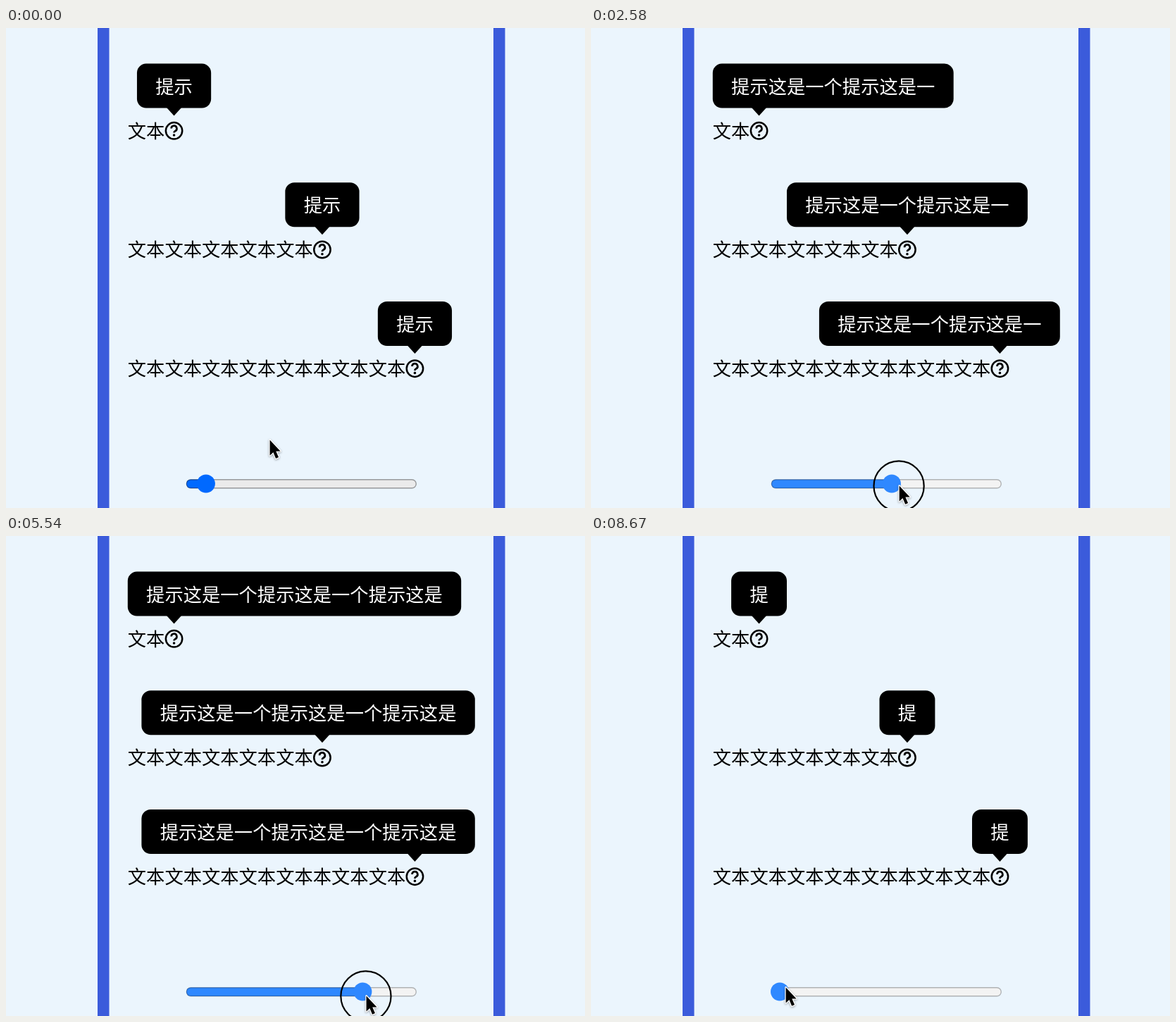
These frames come from a looping animation (822x681 px, 8710 ms). An HTML page:

```html
<!DOCTYPE html>
<html lang="zh-CN">
<head>
<meta charset="utf-8">
<style>
  html, body { margin: 0; width: 100%; height: 100%; overflow: hidden; background: #ebf5fd; }
  svg { display: block; width: 100vw; height: 100vh; }
  text { font: 26.3px "Noto Sans CJK SC", "Noto Sans CJK", "Noto Sans CJK JP", sans-serif; }
  .tip text { fill: #fff; font-weight: 500; }
</style>
</head>
<body>
<svg id="stage" viewBox="0 0 822 681">
  <rect width="822" height="681" fill="#ebf5fd"/>
  <path d="M130 0h16.5v681H130zM692 0h16.5v681H692z" fill="#3b5bdb"/>
  <g id="rows"></g>
  <rect id="track" x="256" y="640.5" width="326.5" height="12.5" rx="6.2"/>
  <rect id="filled" x="256" y="640.5" height="12.5" rx="6.2"/>
  <rect id="border" x="256.3" y="640.8" width="326" height="12" rx="6" fill="none" stroke="#000" stroke-width="1.4"/>
  <circle id="thumb" cy="646.5" r="13"/>
  <g id="pointer">
    <circle id="ring" r="35.6" fill="none" stroke="#000" stroke-width="2.2"/>
    <path d="M.6-.6V21.4L5.4 17 9.1 25.8 13 24.1 9.3 15.5H15.6Z" fill="#000" stroke="#fff"
      stroke-width="2.6" stroke-linejoin="round" paint-order="stroke"
      style="filter:drop-shadow(0 1.5px 1.5px rgba(0,0,0,.35))"/>
  </g>
</svg>
<script>
const LOOP = 8710, PRESS = 960, RELEASE = 8560, LAG = 60;
const EM = 26.3, LEFT = 172.8, RIGHT = 665.8, ROW_STEP = 168.7, LINE = 36.9;
const MAX_CHARS = 20, PER_LINE = 16, THUMB_MIN = 268, THUMB_MAX = 570;
const PHRASE = "提示这是一个".repeat(4);
const LABELS = ["文本", "文本".repeat(5), "文本".repeat(5) + "本" + "文本".repeat(2)];

const pathX = [[40, 374], [880, 281], [1150, 281], [2580, 437], [3710, 548], [4100, 577],
  [4450, 577], [5420, 515], [5540, 511], [6710, 386], [7300, 325], [7700, 295],
  [8100, 281], [8400, 271], [8560, 272], [8670, 276]];
const pathY = [[40, 585], [880, 644], [1150, 644], [2580, 650], [3710, 650], [5540, 653],
  [6710, 649], [8400, 644], [8670, 641]];

const byId = id => document.getElementById(id);
const clamp = (v, lo, hi) => Math.max(lo, Math.min(hi, v));

function add(parent, tag, attrs, text) {
  const el = document.createElementNS("http://www.w3.org/2000/svg", tag);
  set(el, attrs);
  if (text) el.textContent = text;
  return parent.appendChild(el);
}

function set(el, attrs) {
  for (const key in attrs) el.setAttribute(key, attrs[key]);
}

// Monotone cubic interpolation through [time, value] points.
function sample(points, t) {
  const last = points.length - 1;
  if (t <= points[0][0]) return points[0][1];
  if (t >= points[last][0]) return points[last][1];
  const slope = i => (points[i + 1][1] - points[i][1]) / (points[i + 1][0] - points[i][0]);
  const tangent = i => {
    if (i === 0 || i === last) return 0;
    const a = slope(i - 1), b = slope(i);
    return a * b > 0 ? 2 * a * b / (a + b) : 0;
  };
  const i = points.findIndex(p => p[0] > t) - 1;
  const [t0, v0] = points[i], [t1, v1] = points[i + 1];
  const span = t1 - t0, u = (t - t0) / span, w = 1 - u;
  return v0 * (1 + 2 * u) * w * w + v1 * u * u * (3 - 2 * u)
    + span * u * w * (tangent(i) * w - tangent(i + 1) * u);
}

const tips = LABELS.map((label, i) => {
  const row = add(byId("rows"), "g", { transform: `translate(0 ${i * ROW_STEP})` });
  const center = LEFT + label.length * EM + EM / 2;
  add(row, "text", { x: LEFT, y: 155.8 }, label);
  const icon = add(row, "g", { transform: `translate(${center} 145.8)`, fill: "none", stroke: "#000" });
  add(icon, "circle", { r: 11.7, "stroke-width": 2.5 });
  add(icon, "path", { d: "M-3.9-3.2A3.9 3.9 0 1 1 1.6.35Q0 1.1 0 2.8", "stroke-width": 2.7 });
  add(icon, "circle", { cy: 6.2, r: 1.8, fill: "#000", stroke: "none" });
  const tip = add(row, "g", { class: "tip" });
  add(tip, "path", { d: `M${center - 10.5} 113l10.5 11.5 10.5-11.5z` });
  return {
    center,
    box: add(tip, "rect", { rx: 13 }),
    lines: [add(tip, "text", {}), add(tip, "text", { y: 92.6 })]
  };
});

function drawTip({ center, box, lines }, count) {
  const wraps = count > PER_LINE;
  const width = wraps ? RIGHT - LEFT : (count + 2) * EM;
  const x = clamp(center - width / 2, LEFT, RIGHT - width);
  const extra = wraps ? LINE : 0;
  set(box, { x, y: 50.6 - extra, width, height: 63 + extra });
  set(lines[0], { x: x + EM, y: 92.6 - extra });
  set(lines[1], { x: x + EM });
  lines[0].textContent = PHRASE.slice(0, Math.min(count, PER_LINE));
  lines[1].textContent = PHRASE.slice(PER_LINE, Math.max(count, PER_LINE));
}

function sliderColors(t, y) {
  if (t >= PRESS) return ["#2f88ff", "#f3f3f3", 0.27];
  if (y > 634) return ["#0056cc", "#e3e3e3", 0.36];
  return ["#0069ff", "#ebebeb", 0.36];
}

function render(t) {
  const x = sample(pathX, t), y = sample(pathY, t);
  const dragX = sample(pathX, clamp(t - LAG, PRESS, RELEASE));
  const ratio = clamp((dragX - THUMB_MIN) / (THUMB_MAX - THUMB_MIN), 0, 1);
  const step = Math.round(ratio * (MAX_CHARS - 1));
  const thumbX = THUMB_MIN + step / (MAX_CHARS - 1) * (THUMB_MAX - THUMB_MIN);
  const [accent, track, edge] = sliderColors(t, y);

  tips.forEach(tip => drawTip(tip, step + 1));
  set(byId("track"), { fill: track });
  set(byId("filled"), { width: thumbX - 256, fill: accent });
  set(byId("border"), { "stroke-opacity": edge });
  set(byId("thumb"), { cx: thumbX, fill: accent });
  set(byId("pointer"), { transform: `translate(${x} ${y})` });
  set(byId("ring"), { visibility: t >= PRESS && t < RELEASE ? "visible" : "hidden" });
}

const start = performance.now();
function tick() {
  render((performance.now() - start) % LOOP);
  requestAnimationFrame(tick);
}
tick();
</script>
</body>
</html>
```
